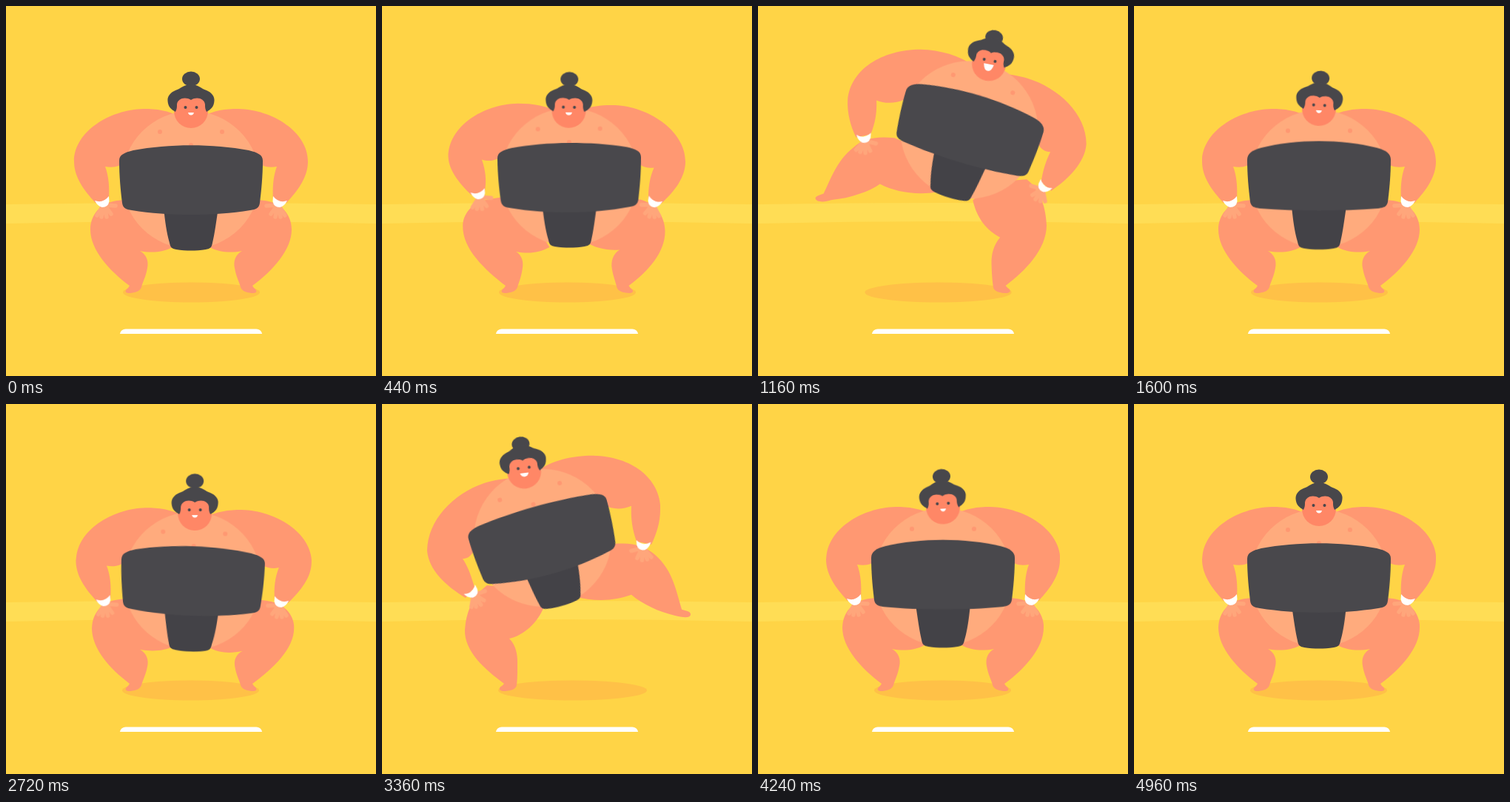
An HTML page without scripts for the animation above (5000 ms loop, 500 by 500 pixels).

```html
<!DOCTYPE html>
<html lang="en">
<head>
<meta charset="utf-8">
<title>Sumo stomp</title>
<style>
html, body { margin: 0; width: 100%; height: 100%; overflow: hidden; background: #ffd446; }
svg { display: block; width: 100vw; height: 100vh; }
.skin { fill: #ff9872; }
.light { fill: #ffab7d; }
.dark { fill: #48474b; }

/* One stomp lasts 2600 ms (52%); the second one is mirrored. */
.anim { animation: 5s cubic-bezier(.35,.15,.6,1) infinite; }
#scene { animation-name: shake; }
#fighter { animation-name: flip; animation-timing-function: step-end; transform-origin: 0 0; }
#shadow { animation-name: shadow; }
#body { animation-name: body; transform-origin: 250px 235px; }
#head { animation-name: head; transform-origin: 250px 142px; }
#bun { animation-name: bun; }
#mouth { animation-name: mouth; transform-origin: 250px 144px; }
#belt { animation-name: belt; }
#legL { animation-name: legL; }
#legR { animation-name: legR; }
#armL { animation-name: armL; }
#armR { animation-name: armR; }
#handL { animation-name: handL; transform-origin: 130px 266px; }
#handR { animation-name: handR; transform-origin: 370px 266px; }

@keyframes flip {
  0% { transform: none; }
  52%, 100% { transform: translate(500px, 0) scale(-1, 1); }
}
@keyframes shake {
  0%, 25.6%, 31.2%, 52%, 77.6%, 83.2%, 100% { transform: translateY(0); }
  26.4%, 78.4% { transform: translateY(9.5px); }
  28%, 80% { transform: translateY(-4px); }
  29.6%, 81.6% { transform: translateY(2px); }
}
@keyframes shadow {
  0%, 11.2%, 26%, 52%, 63.2%, 78%, 100% { cx: 250.5px; rx: 92.5px; }
  15.2%, 67.2% { cx: 242.5px; rx: 100.5px; }
  21.2%, 73.2% { cx: 241px; rx: 102px; }
  24.8%, 76.8% { cx: 244.8px; rx: 97.8px; }
}
@keyframes body {
  0%, 36%, 52%, 88%, 100% { transform: translate(0, 0) rotate(0deg); }
  6.4%, 58.4% { transform: translate(-5px, 10px) rotate(-5deg); animation-timing-function: cubic-bezier(.3,.15,.7,.75); }
  15.2%, 67.2% { transform: translate(32.7px, -54px) rotate(15.7deg); animation-timing-function: cubic-bezier(.3,.5,.6,1); }
  21.2%, 73.2% { transform: translate(41px, -79px) rotate(20deg); animation-timing-function: cubic-bezier(.7,0,1,.7); }
  24.8%, 76.8% { transform: translate(10.5px, -17.5px) rotate(2.2deg); animation-timing-function: linear; }
  26%, 78% { transform: translate(1px, 1px) rotate(0deg); }
  28%, 80% { transform: translate(0, 4px) rotate(0deg); }
  32%, 84% { transform: translate(0, -1.5px) rotate(0deg); }
}
@keyframes head {
  0%, 48%, 52%, 100% { transform: translateY(0) rotate(0deg); }
  6.4%, 58.4% { transform: translateY(5px) rotate(5deg); }
  15.2%, 67.2% { transform: translateY(0) rotate(-8.5deg); }
  21.2%, 73.2% { transform: translateY(0) rotate(-9deg); animation-timing-function: cubic-bezier(.7,0,1,.7); }
  24.8%, 76.8% { transform: translateY(0) rotate(9.8deg); }
  28%, 80% { transform: translateY(4px) rotate(2deg); }
  32%, 84% { transform: translateY(-1.5px) rotate(3deg); }
  38%, 90% { transform: translateY(.8px) rotate(1deg); }
}
@keyframes bun {
  0%, 40%, 52%, 92%, 100% { transform: translateY(0); }
  6.4%, 58.4% { transform: translateY(-1px); }
  15.2%, 67.2% { transform: translateY(6px); }
  21.2%, 73.2% { transform: translateY(6px); }
  24.8%, 76.8% { transform: translateY(7.5px); }
  32%, 84% { transform: translateY(2px); }
}
@keyframes mouth {
  0%, 38%, 52%, 90%, 100% { transform: translate(0, 0) scale(1, 1); }
  6.4%, 58.4% { transform: translate(0, 0) scale(1, 1); }
  15.2%, 67.2% { transform: translate(0, 0) scale(1.45, 1.4); }
  21.2%, 73.2% { transform: translate(0, -1px) scale(1.6, 2); }
  24.8%, 76.8% { transform: translate(0, -2px) scale(1.75, 3); }
  28%, 80% { transform: translate(0, -1px) scale(1.5, 2); }
  32%, 84% { transform: translate(0, 0) scale(1, 1.05); }
}
@keyframes belt {
  0%, 6.4%, 50%, 52%, 58.4%, 100% { d: path("M153 209 C153 201 160 198 172 195 C220 186 280 186 328 195 C340 198 347 201 347 209 C347 230 345 250 343 266 C342 273 338 275 330 276 C280 284 220 284 170 276 C162 275 158 273 157 266 C155 250 153 230 153 209Z"); }
  15.2%, 21.2%, 67.2%, 73.2% { d: path("M153 209 C153 201 160 198 172 196 C220 190 280 190 328 196 C340 198 347 201 347 209 C347 230 345 250 343 266 C342 273 338 276 330 277 C280 288 220 288 170 277 C162 276 158 273 157 266 C155 250 153 230 153 209Z"); }
  24.8%, 32%, 76.8%, 84% { d: path("M153 209 C153 201 160 196 172 193 C220 181 280 181 328 193 C340 196 347 201 347 209 C347 230 345 250 343 266 C342 272 338 274 330 275 C280 279 220 279 170 275 C162 274 158 272 157 266 C155 250 153 230 153 209Z"); }
  28%, 80% { d: path("M153 209 C153 201 160 199 172 197 C220 193 280 193 328 197 C340 199 347 201 347 209 C347 230 345 250 343 266 C342 274 338 277 330 279 C280 290 220 290 170 279 C162 277 158 274 157 266 C155 250 153 230 153 209Z"); }
  37%, 89% { d: path("M153 209 C153 201 160 198 172 196 C220 189 280 189 328 196 C340 198 347 201 347 209 C347 230 345 250 343 266 C342 273 338 276 330 277 C280 287 220 287 170 277 C162 276 158 273 157 266 C155 250 153 230 153 209Z"); }
  43%, 95% { d: path("M153 209 C153 201 160 198 172 195 C220 185 280 185 328 195 C340 198 347 201 347 209 C347 230 345 250 343 266 C342 273 338 275 330 276 C280 283 220 283 170 276 C162 275 158 273 157 266 C155 250 153 230 153 209Z"); }
}
@keyframes legL {
  0%, 26%, 52%, 78%, 100% { d: path("M225 326 C212 333 196 334 181 331 C190 336 193 345 191 354 C189 366 185 372 183 380 C181 386 173 388 165 388 C160 387 161 384 165 381 L167 378 C140 358 114 330 114 302 C114 282 128 266 150 263 L180 260Z"); }
  6.4%, 58.4% { d: path("M222 336 C208 343 196 342 180 338 C189 342 192 350 190 358 C188 368 185 374 183 380 C181 386 173 388 165 388 C160 387 161 384 165 381 L167 378 C138 357 106 332 106 304 C106 286 122 272 146 270 L178 265Z"); animation-timing-function: ease-in; }
  11.2%, 63.2% { d: path("M236 305 C216 316 200 320 184 319 C190 326 191 338 189 350 C188 364 185 372 183 380 C181 386 173 388 165 388 C160 387 161 384 165 381 L167 378 C141 355 114 320 116 282 C118 260 132 244 162 239 L190 235Z"); animation-timing-function: cubic-bezier(.4,.1,.7,.8); }
  15.2%, 67.2% { d: path("M240 260 C212 268 185 266 163 258 C155 265 146 270 136 275 C126 280 116 283 105 286 C97 288 90 289 86 288 C81 286 83 281 88 280 L95 278 C103 254 106 226 131 204 C145 192 160 187 185 189 L215 205Z"); animation-timing-function: cubic-bezier(.3,.5,.6,1); }
  21.2%, 73.2% { d: path("M246 238 C216 243 186 238 164 226 C152 232 142 234 130 236 C116 239 100 240 86 240 C76 243 70 243 66 241 C61 238 63 235 69 233 L76 231 C92 212 104 188 132 172 C146 163 165 160 190 164 L222 180Z"); animation-timing-function: cubic-bezier(.7,0,1,.7); }
  24.8%, 76.8% { d: path("M232 309 C210 313 188 312 168 304 C173 312 172 322 169 332 C165 344 163 352 160 359 C155 362 148 361 143 361 C139 359 140 355 145 354 L144 352 C128 330 113 305 114 277 C115 255 128 242 160 241 L185 240Z"); animation-timing-function: linear; }
}
@keyframes legR {
  0%, 26%, 52%, 78%, 100% { d: path("M275 326 C288 333 304 334 319 331 C310 336 307 345 309 354 C311 366 315 372 317 380 C319 386 327 388 335 388 C340 387 339 384 335 381 L333 378 C360 358 386 330 386 302 C386 282 372 266 350 263 L320 260Z"); }
  6.4%, 58.4% { d: path("M272 330 C286 336 304 336 319 333 C310 338 307 347 309 356 C311 366 315 372 317 380 C319 386 327 388 335 388 C340 387 339 384 335 381 L333 378 C360 358 381 332 381 304 C381 284 367 268 346 266 L318 262Z"); animation-timing-function: cubic-bezier(.3,.15,.7,.75); }
  15.2%, 67.2% { d: path("M281 274 C290 296 308 312 328 317 C319 326 317 338 317 350 C317 362 317 370 318 379 C318 386 328 388 337 388 C343 387 342 383 338 381 L335 378 C362 358 389 334 388 305 C387 283 378 260 358 245 L310 250Z"); animation-timing-function: cubic-bezier(.3,.5,.6,1); }
  21.2%, 73.2% { d: path("M292 252 C297 280 310 298 329 310 C320 322 317 334 317 348 C317 362 317 370 318 379 C318 386 328 388 337 388 C343 387 342 383 338 381 L335 378 C362 358 392 328 392 295 C391 272 386 245 368 228 L318 235Z"); animation-timing-function: cubic-bezier(.7,0,1,.7); }
  24.8%, 76.8% { d: path("M283 309 C290 318 305 326 319 325 C310 331 308 340 309 350 C311 364 315 372 317 380 C319 386 327 388 335 388 C340 387 339 384 335 381 L333 378 C358 358 381 332 381 302 C380 284 368 268 342 262 L315 250Z"); animation-timing-function: linear; }
}
@keyframes armL {
  0%, 26%, 52%, 78%, 100% { d: path("M235 150 C220 141 203 139 186 139 C140 140 92 170 92 210 C92 230 104 248 121 266 L139 262 C140 246 139 230 134 217 C145 219 156 217 162 208 L200 200Z"); }
  6.4%, 58.4% { d: path("M226 160 C211 151 192 149 175 149 C128 150 80 181 80 221 C81 240 98 258 116 273 L134 269 C136 254 133 240 127 227 C138 230 148 227 155 218 L195 205Z"); animation-timing-function: cubic-bezier(.3,.15,.7,.75); }
  15.2%, 67.2% { d: path("M292 92 C270 76 243 70 215 70 C162 71 124 101 124 143 C124 160 129 175 136 190 L156 186 C162 170 164 154 163 138 C175 143 188 143 200 137 L245 135Z"); animation-timing-function: cubic-bezier(.3,.5,.6,1); }
  21.2%, 73.2% { d: path("M304 70 C282 54 255 46 226 45 C172 45 130 72 126 114 C125 130 128 148 134 163 L154 159 C161 144 164 130 164 113 C176 118 190 118 204 113 L252 110Z"); animation-timing-function: cubic-bezier(.7,0,1,.7); }
  24.8%, 76.8% { d: path("M242 132 C228 122 210 119 193 119 C146 119 100 148 100 186 C100 206 111 224 126 241 L144 237 C147 222 147 206 143 191 C153 195 164 193 170 186 L208 180Z"); animation-timing-function: linear; }
}
@keyframes armR {
  0%, 26%, 52%, 78%, 100% { d: path("M265 150 C280 141 297 139 314 139 C360 140 408 170 408 210 C408 230 396 248 379 266 L361 262 C360 246 361 230 366 217 C355 219 344 217 338 208 L300 200Z"); }
  6.4%, 58.4% { d: path("M257 152 C272 144 290 142 307 142 C353 143 402 174 402 214 C402 234 391 251 374 269 L356 265 C354 250 356 234 361 221 C350 223 340 220 334 211 L295 203Z"); animation-timing-function: cubic-bezier(.3,.15,.7,.75); }
  15.2%, 67.2% { d: path("M318 100 C332 100 350 103 362 107 C404 121 439 158 439 198 C437 224 414 246 387 262 L375 248 C379 234 383 221 391 209 C386 209 381 207 377 200 L330 170Z"); animation-timing-function: cubic-bezier(.3,.5,.6,1); }
  21.2%, 73.2% { d: path("M332 82 C346 82 364 86 376 91 C416 106 450 142 450 182 C448 207 425 229 400 245 L387 232 C390 218 394 205 401 192 C395 192 390 189 386 182 L340 152Z"); animation-timing-function: cubic-bezier(.7,0,1,.7); }
  24.8%, 76.8% { d: path("M268 136 C282 130 296 128 312 128 C364 132 416 164 416 206 C415 230 399 252 380 270 L363 264 C362 248 364 234 369 220 C358 220 350 214 346 206 L300 190Z"); animation-timing-function: linear; }
}
@keyframes handL {
  0%, 26%, 52%, 78%, 100% { transform: translate(0, 0) rotate(0deg); }
  6.4%, 58.4% { transform: translate(-5px, 7px) rotate(-2deg); animation-timing-function: cubic-bezier(.3,.15,.7,.75); }
  15.2%, 67.2% { transform: translate(16px, -74.5px) rotate(10deg); animation-timing-function: cubic-bezier(.3,.5,.6,1); }
  21.2%, 73.2% { transform: translate(14px, -101px) rotate(12deg); animation-timing-function: cubic-bezier(.7,0,1,.7); }
  24.8%, 76.8% { transform: translate(5px, -26.5px) rotate(0deg); animation-timing-function: linear; }
}
@keyframes handR {
  0%, 26%, 52%, 78%, 100% { transform: translate(0, 0) rotate(0deg); }
  6.4%, 58.4% { transform: translate(-4px, 3px) rotate(0deg); animation-timing-function: cubic-bezier(.3,.15,.7,.75); }
  15.2%, 67.2% { transform: translate(9px, -10px) rotate(22deg); animation-timing-function: cubic-bezier(.3,.5,.6,1); }
  21.2%, 73.2% { transform: translate(21px, -26px) rotate(25deg); animation-timing-function: cubic-bezier(.7,0,1,.7); }
  24.8%, 76.8% { transform: translate(1px, 4px) rotate(0deg); animation-timing-function: linear; }
}
</style>
</head>
<body>
<svg viewBox="0 0 500 500">
  <defs>
    <g id="hand">
      <path d="M131 270 L123 283 M132 270 L129 285 M133 270 L136 285 M134 270 L142 281 M134 269 L148 270" fill="none" stroke="#ffa67b" stroke-width="5.5" stroke-linecap="round"/>
      <path d="M120 263 Q131 267 139 257 L139.500 264 Q138 272 130 272 Q124 271 120 263Z" fill="#fff"/>
    </g>
  </defs>
  <g id="scene" class="anim">
    <path d="M0 268 Q250 264 500 268 V294 Q250 288 0 294Z" fill="#ffdd55"/>
    <path d="M154 443 C155 438 158 436.500 164 436.500 H336 C342 436.500 345 438 346 443Z" fill="#fff"/>
    <g id="fighter" class="anim">
      <ellipse id="shadow" class="anim" cx="250.500" cy="387" rx="92.500" ry="13.500" fill="#ffc147"/>
      <g class="skin">
        <path id="legL" class="anim"/>
        <path id="legR" class="anim"/>
        <path id="armL" class="anim"/>
        <path id="armR" class="anim"/>
      </g>
      <g id="body" class="anim">
        <circle class="light" cx="250" cy="235" r="93"/>
        <g class="skin">
          <circle cx="208" cy="170" r="3"/>
          <circle cx="292" cy="170" r="3"/>
          <circle cx="250" cy="188" r="3"/>
        </g>
        <path d="M213 272 H287 C284 292 282 308 279 320 C278 327 275 328 270 329 C256 331 244 331 230 329 C224 328 222 326 221 320 C217 306 215 292 213 272Z" fill="#434247"/>
        <path id="belt" class="anim" fill="#49484c"/>
        <g id="head" class="anim">
          <ellipse id="bun" class="anim dark" cx="250" cy="98.500" rx="12" ry="10"/>
          <circle cx="250" cy="142" r="23" fill="#ff8766"/>
          <path class="dark" d="M250 106 C240 106 236 112 229 114 C222 117 218 122 218.500 128 C219 137 224 140 229 143 C231 139 231 137 231 133 C232 125 242 122 250 127 C258 122 268 125 269 133 C269 137 269 139 271 143 C276 140 281 137 281.500 128 C282 122 278 117 271 114 C264 112 260 106 250 106Z"/>
          <circle class="dark" cx="242.500" cy="137" r="2"/>
          <circle class="dark" cx="257.500" cy="137" r="2"/>
          <path id="mouth" class="anim" d="M246 144 H254 Q253 147.500 250 147.500 Q247 147.500 246 144Z" fill="#fff"/>
        </g>
      </g>
      <g id="handL" class="anim"><use href="#hand"/></g>
      <g id="handR" class="anim"><use href="#hand" transform="translate(500 0) scale(-1 1)"/></g>
    </g>
  </g>
</svg>
</body>
</html>
```
